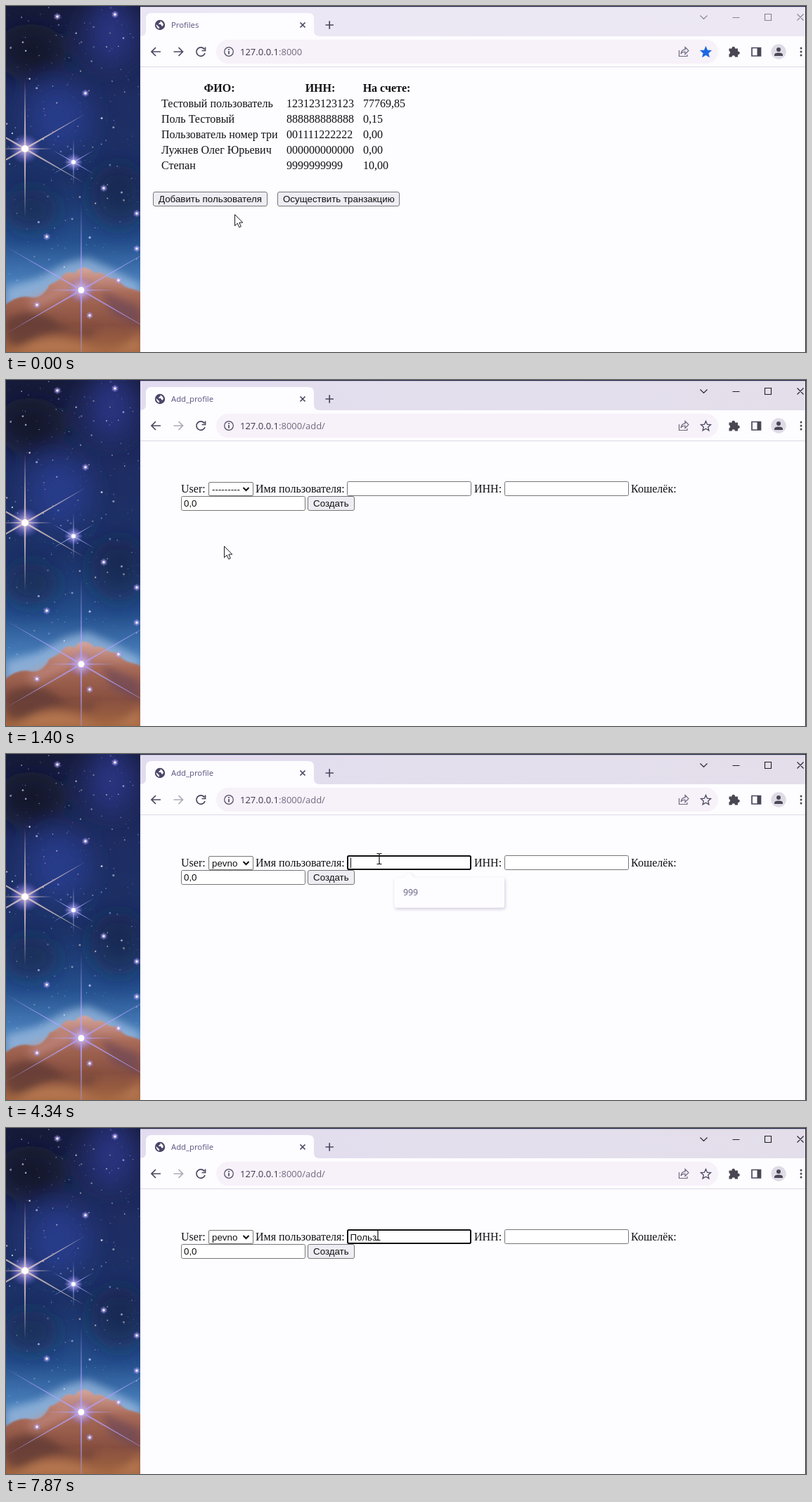
An HTML page that plays this animation: 1138x492 px, repeating every 8 s.

```html
<!DOCTYPE html>
<html lang="ru">
<head>
<meta charset="utf-8">
<title>Profiles</title>
<style>
  html, body { margin: 0; width: 100%; height: 100%; overflow: hidden; background: #fdfcff; }
  svg { display: block; width: 1138px; height: 492px; }
  text { white-space: pre; }
  .ui { font-family: "Open Sans", "Noto Sans", sans-serif; }
  .page { font: 16px "Liberation Serif", "Times New Roman", serif; fill: #111; }
  .ctl { font: 13.333px "Liberation Sans", Arial, sans-serif; fill: #111; }
  .th { font-weight: bold; }
  .box { fill: #fff; stroke: #767676; }
  .btn { fill: #eeedf4; stroke: #767676; }
  .btn.hover { fill: #e4e2e8; stroke: #4f4f4f; }
  .btn.down { fill: #f5f5f5; stroke: #8d8d8d; }
  .ico { fill: none; stroke: #4b4860; stroke-width: 1.7; }
  .thin { stroke-width: 1.2; }
  .win { fill: none; stroke: #222; stroke-width: 1.1; }
</style>
</head>
<body>
<svg viewBox="0 0 1138 492" xmlns="http://www.w3.org/2000/svg">
  <defs>
    <linearGradient id="sky" x2="0" y2="1">
      <stop offset="0" stop-color="#171c3c"/>
      <stop offset=".25" stop-color="#1e2c62"/>
      <stop offset=".5" stop-color="#1d3368"/>
      <stop offset=".68" stop-color="#25518f"/>
      <stop offset=".8" stop-color="#4a80bb"/>
      <stop offset="1" stop-color="#6b86a8"/>
    </linearGradient>
    <linearGradient id="hill" x2="0" y2="1">
      <stop offset="0" stop-color="#d5a59d"/>
      <stop offset=".3" stop-color="#a86a58"/>
      <stop offset=".65" stop-color="#885040"/>
      <stop offset="1" stop-color="#a5683f"/>
    </linearGradient>
    <radialGradient id="glow">
      <stop offset="0" stop-color="#fff"/>
      <stop offset=".25" stop-color="#d9c4ff" stop-opacity=".7"/>
      <stop offset="1" stop-color="#7a6cff" stop-opacity="0"/>
    </radialGradient>
    <linearGradient id="bar">
      <stop offset="0" stop-color="#e2dcf0"/>
      <stop offset=".5" stop-color="#e4dfec"/>
      <stop offset="1" stop-color="#e3deea"/>
    </linearGradient>
    <filter id="haze" x="-50%" y="-50%" width="200%" height="200%"><feGaussianBlur stdDeviation="18"/></filter>
    <filter id="soft" x="-30%" y="-30%" width="160%" height="160%"><feGaussianBlur stdDeviation="6"/></filter>
    <filter id="edge"><feGaussianBlur stdDeviation="1.2"/></filter>
    <filter id="shade" x="-20%" y="-20%" width="140%" height="150%"><feDropShadow dx="1" dy="2" stdDeviation="2" flood-color="#6a5c8c" flood-opacity=".4"/></filter>
    <clipPath id="photo"><path d="M0 0H191V492H0z"/></clipPath>
  </defs>

  <!-- wallpaper -->
  <path fill="#1c2040" d="M0 0H1138V492H0z"/>
  <g clip-path="url(#photo)">
    <path fill="url(#sky)" d="M0 0H191V492H0z"/>
    <g filter="url(#haze)">
      <ellipse cx="35" cy="65" rx="50" ry="40" fill="#14161c" opacity=".7"/>
      <ellipse cx="150" cy="35" rx="35" ry="50" fill="#3442a6" opacity=".6"/>
      <ellipse cx="75" cy="160" rx="45" ry="50" fill="#2f46a4" opacity=".6"/>
      <ellipse cx="160" cy="270" rx="40" ry="45" fill="#142040" opacity=".6"/>
      <ellipse cx="35" cy="290" rx="40" ry="30" fill="#182040" opacity=".6"/>
    </g>
    <g id="dust"></g>
    <path fill="#a3c0e2" opacity=".7" filter="url(#soft)" d="M0 400L45 388 85 366 115 358 150 374 191 396V430H0z"/>
    <path fill="url(#hill)" filter="url(#edge)" d="M-5 428Q16 410 34 414T62 396Q74 392 80 384T98 380Q104 371 112 372T126 380Q134 377 142 383T158 387Q166 400 178 402T196 410V497H-5z"/>
    <g filter="url(#soft)">
      <path fill="#5c3836" opacity=".7" d="M0 445Q40 425 70 448T130 455L120 470Q70 455 40 475T0 470z"/>
      <path fill="#bd7c55" opacity=".75" d="M10 492Q60 460 110 482T191 462V492z"/>
      <path fill="#6d4658" opacity=".7" d="M135 405L191 428V458L150 438z"/>
      <path fill="#c79087" opacity=".6" d="M30 418L90 392 100 405 40 432z"/>
    </g>
    <g id="stars"></g>
  </g>

  <!-- browser frame -->
  <path fill="#fdfcff" d="M191 1.500H1137V492H191z"/>
  <path fill="url(#bar)" d="M191 1.500H1137V43H191z"/>
  <path id="idle" fill="#f5f1fb" opacity=".5" d="M191 1.500H1137V43H191z"/>
  <path fill="#fdfcff" d="M191 43Q199 43 199 35V18Q199 10 207 10H430Q438 10 438 18V35Q438 43 446 43z"/>
  <g transform="translate(219 27)">
    <circle r="7.200" fill="#4b4768"/>
    <path fill="#fdfcff" d="M-5.500-1L-1 3V5.500Q-5 4-5.500-1zM0-5.500Q4-5 5 0L3 2 1-1-2-1-1-3 1-4z"/>
  </g>
  <text id="title" class="ui" x="235" y="31" font-size="11.300" fill="#5a5480"></text>
  <path class="ico" d="M418.500 23.500l7 7m0-7l-7 7"/>
  <path class="ico" d="M454.500 27h11.500M460.200 21.200v11.500"/>
  <g id="winbtns" class="win">
    <path d="M987.500 13.500l5 5 5-5M1033.500 16.500h10M1079.500 11.500h9v9h-9zM1125.500 11.500l9 9m0-9l-9 9"/>
  </g>

  <!-- toolbar -->
  <rect x="299" y="48" width="714" height="34" rx="17" fill="#f7f1f9"/>
  <path d="M191 86.500H1137" stroke="#ddd9e8"/>
  <path class="ico" d="M220 65H207m6-6l-6 6 6 6"/>
  <path class="ico" id="fwd" d="M238.500 65h13m-6-6l6 6-6 6"/>
  <path class="ico" d="M282.200 61.500A6.200 6.200 0 1 0 283 67M283.500 58.500v5h-5"/>
  <circle class="ico thin" cx="317" cy="65" r="6.300"/>
  <path class="ico" d="M317 64v4.500M317 61v1.700"/>
  <text class="ui" x="333" y="70" font-size="13" fill="#3c384e">127.0.0.1<tspan id="path" fill="#706b80"></tspan></text>
  <path class="ico thin" opacity=".8" d="M957.500 63v8.500h11.500V69M960 68q1-6 6-6.200V58.500l5 5-5 5V65q-4 0-6 3z"/>
  <path id="fav" stroke-width="1.300" d="M995.500 58.500l2 4.700 5 .4-3.800 3.300 1.200 5-4.400-2.700-4.400 2.700 1.200-5-3.800-3.300 5-.4z"/>
  <path fill="#4a4752" d="M1028.500 60.500h4a2.300 2.300 0 1 1 4.500 0h4v4a2.300 2.300 0 1 1 0 4.500v3.500h-4a2.200 2.200 0 0 0-4.400 0h-4.100v-4a2.300 2.300 0 0 0 0-4.400z"/>
  <path class="ico" d="M1061 59.500h12.500v11.500H1061z"/>
  <path fill="#4a4752" d="M1068.500 59h5v12h-5z"/>
  <circle cx="1099" cy="65" r="10.700" fill="#dfdbe6"/>
  <path fill="#4a4655" d="M1093 71v-1.500q0-3 6-3t6 3V71z"/>
  <circle cx="1099" cy="62" r="3" fill="#4a4655"/>
  <g fill="#4a4752"><circle cx="1131" cy="60" r="1.500"/><circle cx="1131" cy="65" r="1.500"/><circle cx="1131" cy="70" r="1.500"/></g>

  <!-- list page -->
  <g id="list">
    <g id="table" class="page"></g>
    <rect id="add" class="btn" x="209.500" y="264.500" width="162" height="20" rx="2.500"/>
    <text class="ctl" x="217" y="279">Добавить пользователя</text>
    <rect class="btn" x="386.500" y="264.500" width="173" height="20" rx="2.500"/>
    <text class="ctl" x="394" y="279">Осуществить транзакцию</text>
  </g>

  <!-- form page -->
  <g id="form">
    <g class="page">
      <text x="249" y="160">User:</text>
      <text x="355" y="160">Имя пользователя:</text>
      <text x="666" y="160">ИНН:</text>
      <text x="889" y="160">Кошелёк:</text>
    </g>
    <rect id="select" class="box" x="288.500" y="145.500" width="63" height="19" rx="1.500"/>
    <text id="chosen" class="ctl" x="293" y="159.500"></text>
    <path d="M337.500 153l4 4 4-4" fill="none" stroke="#111" stroke-width="2"/>
    <rect class="box" x="485.500" y="144.500" width="176" height="20" rx="2"/>
    <rect class="box" x="709.500" y="144.500" width="176" height="20" rx="2"/>
    <rect class="box" x="249.500" y="165.500" width="176" height="20" rx="2"/>
    <text class="ctl" x="253" y="180">0,0</text>
    <rect class="btn" x="429.500" y="165.500" width="66" height="20" rx="2.500"/>
    <text class="ctl" x="437" y="180">Создать</text>
    <rect id="focus" x="486" y="145" width="175" height="19" rx="2" fill="none" stroke="#111" stroke-width="2"/>
    <text id="typed" class="ctl" x="489.500" y="159.500"></text>
    <path id="caret" d="M0 147.500V162" stroke="#111"/>
    <g id="hint">
      <path filter="url(#shade)" fill="#fdfcff" d="M555 175.500H565.500L573 168 580.500 175.500H706Q709 175.500 709 178.500V215.500Q709 218.500 706 218.500H555Q552.500 218.500 552.500 215.500V178.500Q552.500 175.500 555 175.500z"/>
      <text class="ui" x="565" y="201" font-size="12.300" fill="#3a3560">999</text>
    </g>
    <g id="menu">
      <rect filter="url(#shade)" class="box" x="288.500" y="164.500" width="63" height="167"/>
      <rect id="mark" x="289" width="62" height="16.600" fill="#1c67cc"/>
      <g id="options" class="ctl"></g>
    </g>
  </g>

  <path d="M1137.500 0V492" stroke="#23232e"/>
  <g id="pointer">
    <path id="arrow" fill="#fff" stroke="#1b1b22" d="M.5.5V16.500L4.200 13 6.800 18.700 9.300 17.600 6.800 12H11.800z"/>
    <path id="beam" fill="none" stroke="#111" stroke-width="1.200" d="M-3.500-7.500H-1.500Q0-7.500 0-6 0-7.500 1.500-7.500H3.500M0-6.500V6.500M-3.500 7.500H-1.500Q0 7.500 0 6 0 7.500 1.500 7.500H3.500"/>
  </g>
</svg>
<script>
const LOOP = 8000, OPEN = 1850, PICK = 3620, FOCUS = 4200, SWAP = 1130;
const ROW_TOP = 164.8, ROW_H = 16.5;
const $ = id => document.getElementById(id);
const show = (id, on) => { $(id).style.display = on ? '' : 'none'; };

const users = ['---------', 'admin', 'Torvi', 'melvo', 'dunka', 'Golbo', 'pevno', 'ju', 'kasto', 'bilmo'];
const people = [
  ['Тестовый пользователь', '123123123123', '77769,85'],
  ['Поль Тестовый', '888888888888', '0,15'],
  ['Пользователь номер три', '001111222222', '0,00'],
  ['Лужнев Олег Юрьевич', '000000000000', '0,00'],
  ['Степан', '9999999999', '10,00']
];
// [time, x, y] of the pointer
const route = [
  [0, 325, 296], [400, 325, 296], [700, 304, 279], [1230, 304, 279], [1720, 322, 157],
  [1950, 322, 157], [2140, 333, 217], [2280, 334, 240], [2600, 329, 260], [2800, 329, 260],
  [2870, 329, 261], [3450, 329, 261], [3560, 327, 270], [3660, 327, 270], [3990, 522, 153],
  [4200, 531, 149], [4670, 531, 149], [4870, 529, 152], [LOOP, 529, 152]
];
// [time, letters typed]
const keys = [[6700, 1], [6830, 2], [6980, 3], [7210, 4], [7340, 5]];

function pointerAt(t) {
  const i = Math.max(1, route.findIndex(p => p[0] > t));
  const [t0, x0, y0] = route[i - 1], [t1, x1, y1] = route[i];
  const k = (t - t0) / (t1 - t0);
  return [x0 + (x1 - x0) * k, y0 + (y1 - y0) * k];
}

function caretOn(t) {
  if (t < FOCUS) return false;
  if (t >= keys[0][0]) return t < 7840;
  return t < 4870 || (t >= 5410 && t < 5910) || t >= 6410;
}

function buildTable() {
  const cell = (x, y, s, extra = '') => `<text x="${x}" y="${y}" ${extra}>${s}</text>`;
  const head = 'class="th" text-anchor="middle"';
  $('table').innerHTML =
    cell(303.5, 122, 'ФИО:', head) + cell(447, 122, 'ИНН:', head) + cell(541.5, 122, 'На счете:', head) +
    people.map((r, i) => r.map((s, c) => cell([221, 399, 508][c], 144 + 22 * i, s)).join('')).join('');
  $('options').innerHTML = users.map((s, i) => cell(293, 177.6 + ROW_H * i, s)).join('');
}

function buildStars() {
  let seed = 11;
  const rnd = () => (seed = seed * 16807 % 2147483647) / 2147483647;
  const tints = ['#fff', '#b9c4ff', '#8fa0f0', '#e8d2c4'];
  let dots = '';
  for (let i = 0; i < 260; i++) {
    const r = 0.4 + 1.2 * rnd() ** 4;
    dots += `<circle cx="${rnd() * 191}" cy="${rnd() * 400}" r="${r}" fill="${tints[i % 4]}" opacity="${0.3 + 0.6 * rnd()}"/>`;
  }
  $('dust').innerHTML = dots;

  const ray = (a, len, w) => `<path transform="rotate(${a})" d="M${-len} 0L0 ${-w} ${len} 0 0 ${w}z"/>`;
  const star = (x, y, len, core, fill) => `<g transform="translate(${x} ${y})">
    <circle r="${core * 2.2}" fill="url(#glow)"/>
    <g fill="${fill}" opacity=".75">${[90, 30, -30].map(a => ray(a, len, core / 7)).join('')}${ray(0, len * .4, core / 9)}</g>
    <circle r="${core / 2}" fill="#fff"/></g>`;
  $('stars').innerHTML =
    star(27, 203, 98, 10, '#e9d2cc') + star(96, 222, 34, 6, '#a9b4ff') + star(107, 404, 125, 9, '#b0a2ff') +
    [[73, 15], [155, 12], [139, 259], [186, 295], [186, 345], [58, 328], [119, 440], [44, 425], [160, 390], [113, 124]]
      .map(([x, y]) => star(x, y, 6, 2.6, '#d8d4ff')).join('');
}

function render(t) {
  const [x, y] = pointerAt(t);
  const form = t >= SWAP, open = t >= OPEN && t < PICK, focused = t >= FOCUS;

  show('idle', t < 100);
  $('winbtns').style.opacity = t < 100 ? 0.5 : 1;
  $('title').textContent = form ? 'Add_profile' : 'Profiles';
  $('path').textContent = form ? ':8000/add/' : ':8000';
  $('fwd').style.opacity = form ? 0.45 : 1;
  $('fav').setAttribute('fill', form ? 'none' : '#1c68e4');
  $('fav').setAttribute('stroke', form ? '#4b4860' : '#1c68e4');

  show('list', !form);
  show('form', form);
  const over = y < 285 && y > 264;
  $('add').setAttribute('class', 'btn' + (t > 900 && t < 1000 ? ' down' : over ? ' hover' : ''));

  $('chosen').textContent = t < PICK ? users[0] : users[6];
  $('select').style.stroke = open ? '#111' : '';
  show('menu', open);
  if (open) {
    const seenY = pointerAt(t - 30)[1];
    const row = Math.max(0, Math.floor((seenY - ROW_TOP) / ROW_H));
    $('mark').setAttribute('y', ROW_TOP + row * ROW_H);
    [...$('options').children].forEach((o, i) => { o.style.fill = i === row ? '#fff' : ''; });
  }

  const count = keys.filter(k => t >= k[0]).length;
  const typed = $('typed');
  typed.textContent = 'Польз'.slice(0, count);
  show('focus', focused);
  show('caret', caretOn(t));
  const end = count && form ? typed.getComputedTextLength() : 0;
  $('caret').setAttribute('transform', `translate(${Math.round(489.5 + end) + 0.5} 0)`);
  show('hint', focused && !count);
  $('hint').style.opacity = Math.min(1, Math.max(0, (t - 4230) / 140));

  const text = form && !open && x > 485 && x < 662 && y > 144 && y < 166;
  show('beam', text);
  show('arrow', !text);
  $('pointer').setAttribute('transform', `translate(${Math.round(x)} ${Math.round(y)})`);
}

function tick() {
  render(performance.now() % LOOP);
  requestAnimationFrame(tick);
}

buildTable();
buildStars();
tick();
</script>
</body>
</html>
```
